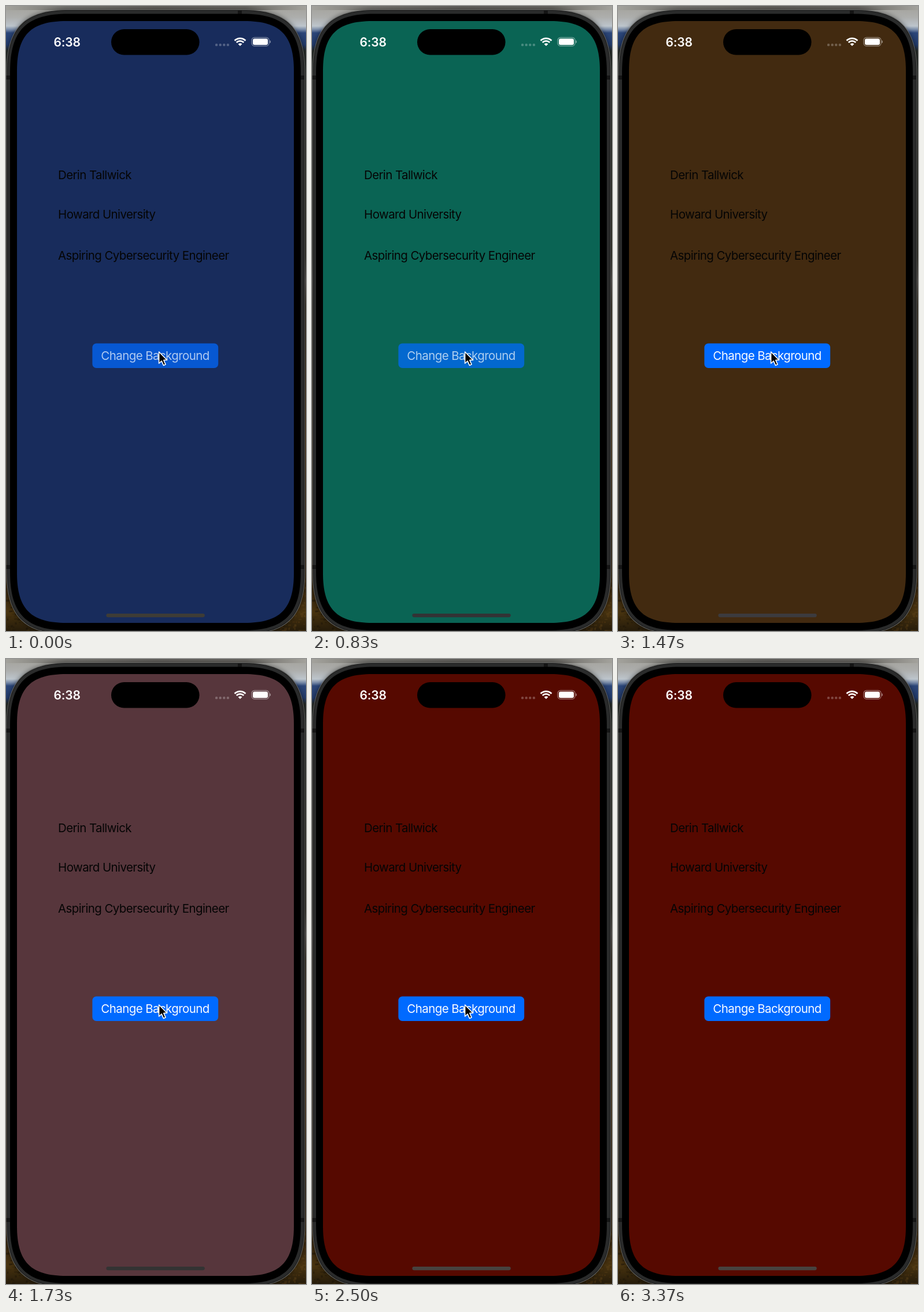
Write an HTML page with a canvas that moves like this. It is 519 px wide and 1079 px high and loops after 3410 ms.

```html
<!DOCTYPE html>
<html lang="en">
<head>
<meta charset="utf-8">
<title>Change Background</title>
<style>
html, body { margin: 0; width: 100%; height: 100%; overflow: hidden; background: #000; }
canvas { display: block; }
</style>
</head>
<body>
<canvas id="stage" width="519" height="1079"></canvas>
<script>
const W = 519, H = 1079, LOOP = 3410;
const ctx = document.getElementById('stage').getContext('2d');
const FONT = 'Inter, "Liberation Sans", sans-serif';

// Each scene lasts until `end`; the button is held down from `press`.
const scenes = [
  { end: 30, press: 0, color: '#182c5c', bar: '#3e3c36' },
  { end: 870, press: 790, color: '#0a6454', bar: '#333335' },
  { end: 1680, press: 1590, color: '#422a10', bar: '#3c3b3e' },
  { end: 2490, press: 2390, color: '#57363c', bar: '#333333' },
  { end: LOOP, press: LOOP, color: '#560900', bar: '#47423f' }
];
const CURSOR_END = 3300;

const labels = [
  ['Derin Tallwick', 299],
  ['Howard University', 367],
  ['Aspiring Cybersecurity Engineer', 438]
];

function gradient(x0, y0, x1, y1, stops) {
  const g = ctx.createLinearGradient(x0, y0, x1, y1);
  stops.forEach(([at, color]) => g.addColorStop(at, color));
  return g;
}

function rect(x, y, w, h, fill) {
  ctx.fillStyle = fill;
  ctx.fillRect(x, y, w, h);
}

function pill(x, y, w, h, r, fill) {
  ctx.beginPath();
  ctx.roundRect(x, y, w, h, r);
  ctx.fillStyle = fill;
  ctx.fill();
}

// Rounded box whose corners ease gradually into the straight sides.
function smoothBox(left, top, right, bottom, r, fill) {
  const a = 1.28 * r, c = 0.355 * r;
  ctx.beginPath();
  ctx.moveTo(left + a, top);
  ctx.lineTo(right - a, top);
  ctx.bezierCurveTo(right - c, top, right, top + c, right, top + a);
  ctx.lineTo(right, bottom - a);
  ctx.bezierCurveTo(right, bottom - c, right - c, bottom, right - a, bottom);
  ctx.lineTo(left + a, bottom);
  ctx.bezierCurveTo(left + c, bottom, left, bottom - c, left, bottom - a);
  ctx.lineTo(left, top + a);
  ctx.bezierCurveTo(left, top + c, left + c, top, left + a, top);
  ctx.closePath();
  ctx.fillStyle = fill;
  ctx.fill();
}

function text(str, x, y, fill, { size = 20.5, weight = 400, align = 'left', spacing = -0.6 } = {}) {
  ctx.font = `${weight} ${size}px ${FONT}`;
  ctx.letterSpacing = spacing + 'px';
  ctx.textAlign = align;
  ctx.fillStyle = fill;
  ctx.fillText(str, x, y);
}

function seeded(seed) {
  return () => (seed = (seed * 16807) % 2147483647) / 2147483647;
}

function drawFoliage() {
  const random = seeded(41);
  const tones = ['#1c1408', '#4b3210', '#37290d', '#5c4318'];
  for (let i = 0; i < 260; i++) {
    const x = (i % 2 ? W - 45 : 0) + random() * 45;
    const y = 990 + random() * 89;
    ctx.globalAlpha = 0.5;
    rect(x, y, 2 + random() * 4, 1 + random() * 3, tones[i % tones.length]);
  }
  ctx.globalAlpha = 1;
}

function drawLandscape() {
  rect(0, 0, W, H, gradient(0, 0, 0, H, [
    [0, '#a3a29c'], [0.018, '#adaeac'], [0.032, '#bdc5cc'], [0.038, '#7588a6'],
    [0.043, '#2b4679'], [0.062, '#213a6b'], [0.072, '#252a26'], [0.4, '#1d1c10'],
    [0.44, '#4a4540'], [0.48, '#241c0c'], [0.7, '#4a3211'], [0.85, '#2a1c08'],
    [0.94, '#3a280e'], [0.97, '#48330f'], [1, '#251b0a']
  ]));
  rect(0, 0, W, 7, gradient(0, 0, W, 0, [
    [0, '#a3a29c'], [0.2, '#767570'], [0.5, '#63615d'], [0.8, '#686661'], [1, '#a3a29c']
  ]));
  drawFoliage();
}

function drawPhone() {
  ctx.save();
  ctx.shadowColor = 'rgba(0,0,0,0.45)';
  ctx.shadowBlur = 9;
  smoothBox(0.5, 6, 517.5, 1085, 86, '#666765');
  ctx.restore();
  smoothBox(1.5, 7, 516.5, 1084, 85, '#171717');
  smoothBox(2.5, 8, 515.5, 1083, 84, '#2a2b2b');
  for (const y of [120, 965]) {
    rect(1, y, 6, 7, '#151515');
    rect(510, y, 6, 7, '#151515');
  }
  rect(401, 8, 7, 6, '#151515');
  smoothBox(7, 13.5, 510, 1078, 79, '#000');
}

function drawWifi(x, y) {
  ctx.strokeStyle = '#fff';
  ctx.lineWidth = 2.7;
  for (const r of [8.7, 13.2]) {
    ctx.beginPath();
    ctx.arc(x, y, r, -Math.PI * 0.755, -Math.PI * 0.245);
    ctx.stroke();
  }
  ctx.beginPath();
  ctx.moveTo(x, y);
  ctx.arc(x, y, 4.8, -Math.PI * 0.755, -Math.PI * 0.245);
  ctx.fillStyle = '#fff';
  ctx.fill();
}

function drawStatusBar() {
  text('6:38', 82.6, 69.5, '#fff', { size: 21, weight: 600, spacing: -0.2 });
  pill(182, 40, 152.6, 44.5, 22.25, '#000');
  for (let i = 0; i < 4; i++) pill(362 + i * 6.6, 65, 4.2, 4.2, 1.5, 'rgba(255,255,255,0.25)');
  drawWifi(405, 69);
  ctx.beginPath();
  ctx.roundRect(425, 54.3, 30, 14.8, 4.8);
  ctx.strokeStyle = 'rgba(255,255,255,0.45)';
  ctx.lineWidth = 1.2;
  ctx.stroke();
  pill(427, 56.2, 26, 11, 3, '#fff');
  pill(456.3, 59.2, 1.7, 5, [0, 2, 2, 0], 'rgba(255,255,255,0.45)');
}

function drawButton(pressed) {
  ctx.globalAlpha = pressed ? 0.72 : 1;
  pill(149.4, 582.4, 217.8, 42.6, 7, '#006aff');
  ctx.globalAlpha = 1;
  const ink = pressed ? 'rgba(255,255,255,0.68)' : '#f8fbff';
  text('Change Background', 258, 611, ink, { align: 'center' });
}

function drawCursor() {
  const points = [[0, 0], [0, 20], [4.6, 15.9], [7.9, 23.4], [11.5, 21.8], [8.2, 14.4], [14, 14.2]];
  ctx.beginPath();
  points.forEach(([x, y]) => ctx.lineTo(264.6 + x, 597 + y));
  ctx.closePath();
  ctx.lineJoin = 'round';
  ctx.strokeStyle = '#fff';
  ctx.lineWidth = 1.6;
  ctx.fillStyle = '#000';
  ctx.fill();
  ctx.stroke();
}

function draw(now) {
  const t = now % LOOP;
  const scene = scenes.find(s => t < s.end);
  drawLandscape();
  drawPhone();
  smoothBox(19, 26, 498, 1065, 67, scene.color);
  drawStatusBar();
  labels.forEach(([label, y]) => text(label, 90, y, '#050505'));
  drawButton(t >= scene.press);
  pill(173.4, 1049, 170.4, 6.2, 3.1, scene.bar);
  if (t < CURSOR_END) drawCursor();
}

let start;
function tick(now) {
  start ??= now;
  draw(now - start);
  requestAnimationFrame(tick);
}
draw(0);
requestAnimationFrame(tick);
</script>
</body>
</html>
```
